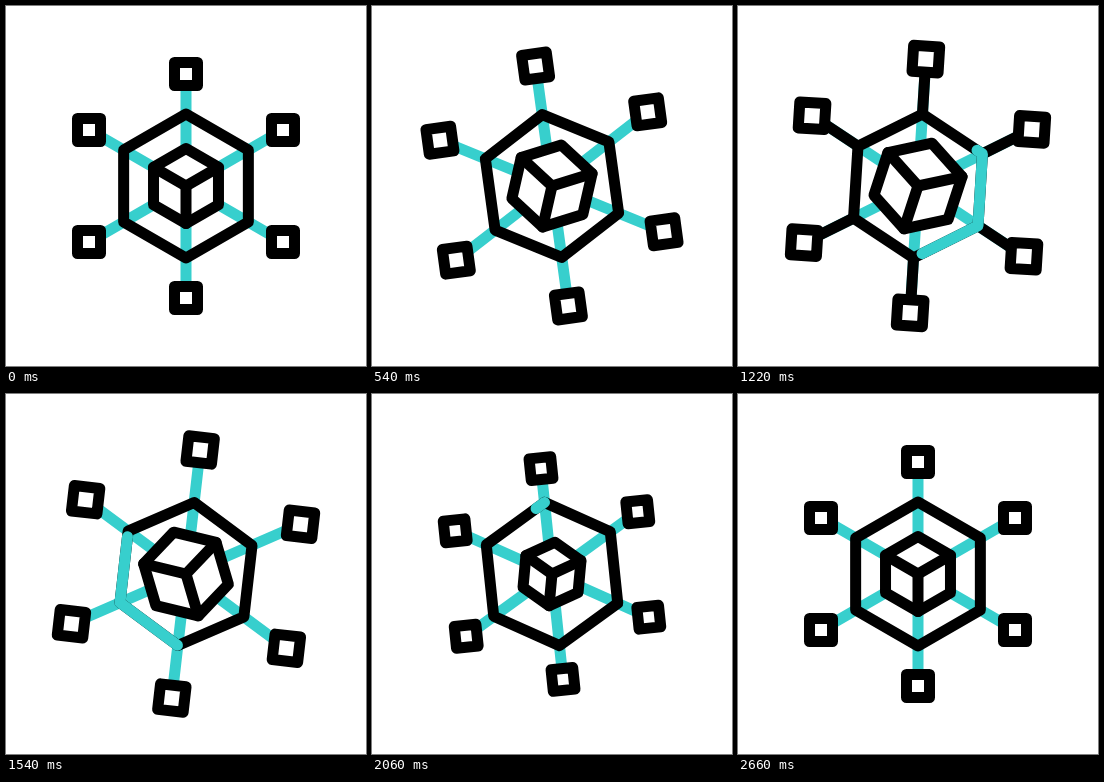
An HTML page with a canvas that plays this animation: 360 px wide and 360 px high, repeating every 3 s.

```html
<!DOCTYPE html>
<html lang="en">
<head>
<meta charset="utf-8">
<title>Block network</title>
<style>
  html, body { margin: 0; width: 100%; height: 100%; overflow: hidden; background: #fff; }
  canvas { display: block; }
</style>
</head>
<body>
<canvas id="stage" width="360" height="360"></canvas>
<script>
const ctx = document.getElementById('stage').getContext('2d');
const LOOP = 3000, BLACK = '#000', CYAN = '#37cfcd', WIDTH = 11;
const HEX_R = 72, CUBE_R = 37.5, NODE_R = 112, NODE_HALF = 11.5;

// Keys are [time, value]; motion eases in and out between neighbours.
const swing = [[220, 0], [790, -13], [1410, 8], [2030, -6], [2660, 0]];
const spread = [[220, 1], [790, 1.135], [1410, 1.135], [2030, 0.946], [2660, 1]];
const cubeTurn = [[220, 0], [970, 33], [1690, -22], [2170, 9], [2660, 0]];
const cubeScale = [[220, 1], [790, 1.2], [1410, 1.2], [2030, 0.85], [2660, 1]];
const pulseHead = [[540, 0], [1130, 1]];
const pulseTail = [[900, 0], [1490, 1]];
const ringHead = [[560, 0], [1920, 6]];
const ringTail = [[890, 0], [2190, 6]];

function at(keys, t) {
  if (t <= keys[0][0]) return keys[0][1];
  for (let i = 1; i < keys.length; i++) {
    const [t0, a] = keys[i - 1], [t1, b] = keys[i];
    if (t < t1) return a + (b - a) * (0.5 - 0.5 * Math.cos(Math.PI * (t - t0) / (t1 - t0)));
  }
  return keys[keys.length - 1][1];
}

// Angles in degrees, clockwise from straight up.
function polar(r, deg) {
  const a = deg * Math.PI / 180;
  return [r * Math.sin(a), -r * Math.cos(a)];
}

function line(points, color, closed, fill) {
  ctx.beginPath();
  points.forEach(p => ctx.lineTo(...p));
  if (closed) ctx.closePath();
  if (fill) { ctx.fillStyle = fill; ctx.fill(); }
  ctx.strokeStyle = color;
  ctx.stroke();
}

const hexagon = (r, turn) => [0, 1, 2, 3, 4, 5].map(i => polar(r, turn + i * 60));

// Point on the ring, measured in edges from the top corner.
function ringPoint(s, turn) {
  const i = Math.floor(s), f = s - i;
  const a = polar(HEX_R, turn + i * 60), b = polar(HEX_R, turn + i * 60 + 60);
  return [a[0] + (b[0] - a[0]) * f, a[1] + (b[1] - a[1]) * f];
}

function drawSpokes(t, turn, nodeR) {
  const head = at(pulseHead, t), tail = at(pulseTail, t);
  for (let i = 0; i < 6; i++) {
    const deg = turn + i * 60;
    line([[0, 0], polar(nodeR, deg)], CYAN);
    if (head > tail) line([polar(nodeR * tail, deg), polar(nodeR * head, deg)], BLACK);
  }
}

function drawNodes(turn, nodeR, half) {
  const corners = [45, 135, 225, 315].map(d => polar(half * Math.SQRT2, turn + d));
  for (const [x, y] of hexagon(nodeR, turn)) {
    line(corners.map(c => [x + c[0], y + c[1]]), BLACK, true, '#fff');
  }
}

function drawRing(t, turn) {
  line(hexagon(HEX_R, turn), BLACK, true);
  const head = at(ringHead, t), tail = at(ringTail, t);
  if (head <= tail) return;
  const points = [ringPoint(tail, turn)];
  for (let i = Math.floor(tail) + 1; i < head; i++) points.push(ringPoint(i, turn));
  points.push(ringPoint(head, turn));
  line(points, CYAN);
}

function drawCube(t) {
  const corners = hexagon(CUBE_R * at(cubeScale, t), at(cubeTurn, t));
  line(corners, BLACK, true, '#fff');
  for (const i of [1, 3, 5]) line([[0, 0], corners[i]], BLACK);
}

function frame() {
  const t = performance.now() % LOOP;
  const turn = at(swing, t), scale = at(spread, t);
  ctx.setTransform(1, 0, 0, 1, 0, 0);
  ctx.fillStyle = '#fff';
  ctx.fillRect(0, 0, 360, 360);
  ctx.translate(180, 180);
  ctx.lineWidth = WIDTH;
  ctx.lineCap = ctx.lineJoin = 'round';
  drawSpokes(t, turn, NODE_R * scale);
  drawNodes(turn, NODE_R * scale, NODE_HALF * scale);
  drawRing(t, turn);
  drawCube(t);
  requestAnimationFrame(frame);
}
frame();
</script>
</body>
</html>
```
